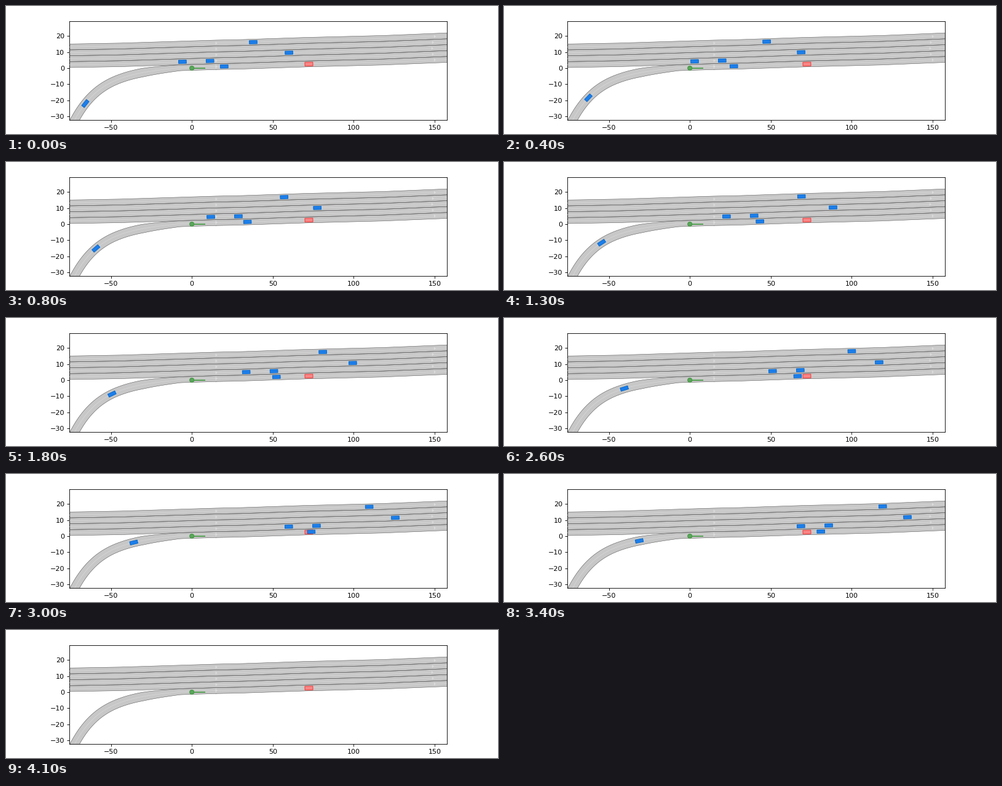
Recreate the animation shown at these times as a matplotlib script. Size 800x210 px, loop 4.7 s.

```python
import numpy as np
import matplotlib.pyplot as plt
from matplotlib.animation import FuncAnimation
from matplotlib.patches import Circle, Polygon

W, H, DPI = 800, 210, 80
FRAMES, INTERVAL = 47, 100
LAST_STEP = 40          # traffic disappears after this step
SCALE = 2.632           # pixels per metre
LEFT, RIGHT = 103.1, 716.9
BOTTOM, TOP = 186.9, 25.2
X0, Y0 = 302.2, 101.9   # stage position of the road origin

ROAD, BOUND, MARK = "#c7c7c7", "#555555", "#dddddd"
CAR_FILL, CAR_EDGE = "#1d7eea", "#0066cc"
LANE = 3.67
MERGE_X = 15            # the ramp becomes the fifth lane here
BENDS = np.array([(-80, 14.95), (-44, 15.6), (15, 17.45), (30, 17.75),
                  (70, 19.1), (118, 20.3), (162, 22.1)])

fig = plt.figure(figsize=(W / DPI, H / DPI), dpi=DPI, facecolor="white")
ax = fig.add_axes([LEFT / W, 0.11, (RIGHT - LEFT) / W, 0.77])
ax.set_xlim((LEFT - X0) / SCALE, (RIGHT - X0) / SCALE)
ax.set_ylim((Y0 - BOTTOM) / SCALE, (Y0 - TOP) / SCALE)
ax.set_xticks(range(-50, 151, 50))
ax.set_yticks(range(-30, 21, 10))


def road_y(x, k):
    """Height of the line k lane widths below the road's upper edge."""
    return np.interp(x, *BENDS.T) - k * LANE


def ramp_y(x):
    """Ramp centre: falls away from the merge lane towards the left."""
    return road_y(x, 4.5) - 1.2 * np.sinh(0.0603 * np.maximum(0, -x - 7))


def box(x, y, angle, length, width):
    along = np.array([np.cos(angle), np.sin(angle)]) * length / 2
    across = np.array([-np.sin(angle), np.cos(angle)]) * width / 2
    return np.array([x, y]) + [along + across, along - across,
                               -along - across, -along + across]


def draw_lane(left, right):
    ax.add_patch(Polygon(np.vstack([left, right[::-1]]),
                         facecolor=ROAD, edgecolor="none", zorder=2))
    for side in (left, right):
        ax.plot(*side.T, color=BOUND, lw=0.5, zorder=4)
    ax.plot(*((left + right) / 2).T, color=MARK, lw=0.5, zorder=3)


def draw_road_lane(k, start):
    x = BENDS[BENDS[:, 0] >= start, 0]
    draw_lane(*(np.column_stack([x, road_y(x, line)])
                for line in (k, k + 1)))


def draw_ramp():
    x = np.linspace(-75.5, MERGE_X, 60)
    y = ramp_y(x)
    slope = np.gradient(y, x)
    normal = np.column_stack([-slope, np.ones_like(x)])
    normal /= np.hypot(slope, 1)[:, None]
    half = np.interp(x, [-30, -8], [2.65, LANE / 2])[:, None]
    centre = np.column_stack([x, y])
    draw_lane(centre + normal * half, centre - normal * half)


def draw_arrow(x, lane):
    y = road_y(x, lane + 0.5)
    ax.add_patch(Polygon([(x, y + 0.9), (x + 1.3, y), (x, y - 0.9)],
                         facecolor=MARK, edgecolor="none", zorder=5))


draw_ramp()
for lane in range(5):
    draw_road_lane(lane, MERGE_X if lane == 4 else -80)
    draw_arrow(14.6, lane)
    draw_arrow(148 + 0.4 * (lane - 2) ** 2, lane)

# Goal area and start state
ax.add_patch(Polygon(box(72.3, 2.5, 0.026, 4.9, 2.4), facecolor="#f98585",
                     edgecolor="#f23a3a", lw=0.9, zorder=15))
ax.plot([0, 8.2], [0, 0], color="#3c963c", lw=1.5, zorder=11,
        solid_capstyle="butt")
ax.add_patch(Circle((0, 0), 1.35, facecolor="#5aa55a", edgecolor="#3c963c",
                    lw=0.8, zorder=12))


class Car:
    """Drives along a curve y(x) at constant speed."""

    def __init__(self, curve, start, speed):
        self.speed = speed
        self.x = np.linspace(start, start + 110, 500)
        self.y = curve(self.x)
        step = np.hypot(np.diff(self.x), np.diff(self.y))
        self.dist = np.concatenate([[0], np.cumsum(step)])
        self.angle = np.arctan(np.gradient(self.y, self.x))
        self.patch = ax.add_patch(Polygon(self.corners(0), lw=0.8, zorder=20,
                                          facecolor=CAR_FILL,
                                          edgecolor=CAR_EDGE))

    def corners(self, step):
        x, y, angle = (np.interp(self.speed * step, self.dist, values)
                       for values in (self.x, self.y, self.angle))
        return box(x, y, angle, 4.8, 2.1)

    def move(self, step):
        self.patch.set_xy(self.corners(step))
        self.patch.set_visible(step <= LAST_STEP)


def lane_centre(lane):
    return lambda x: road_y(x, lane + 0.5)


cars = [
    Car(lane_centre(0), 37.9, 2.39),
    Car(lane_centre(2), 60.0, 2.19),
    Car(lane_centre(3), -5.8, 2.19),
    Car(lane_centre(3), 11.2, 2.195),
    Car(lane_centre(4), 20.0, 1.793),
    Car(ramp_y, -65.8, 1.19),
]


def update(step):
    for car in cars:
        car.move(step)
    return [car.patch for car in cars]


anim = FuncAnimation(fig, update, frames=FRAMES, interval=INTERVAL,
                     init_func=lambda: update(0), repeat=True,
                     repeat_delay=0, blit=False)
plt.show()
```
